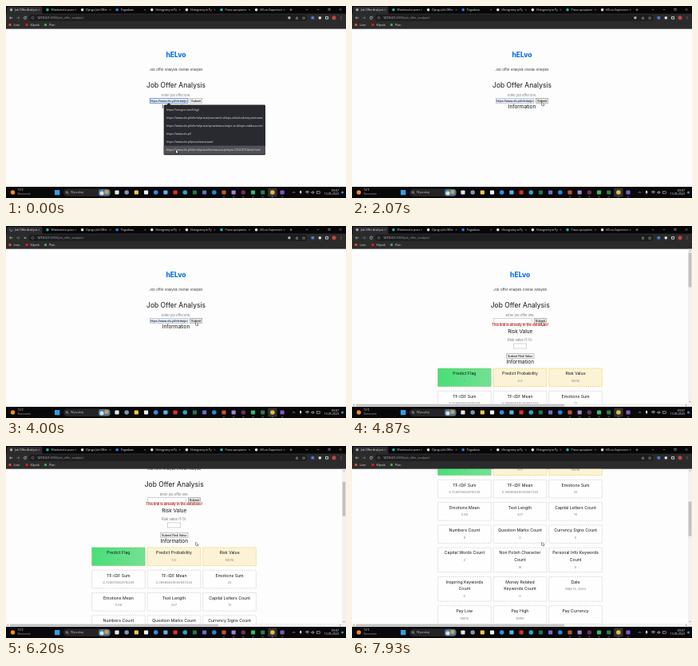
Recreate the animation shown at these times as an HTML page with a canvas. Size 426 by 240 pixels, loop 8000 ms.

```html
<!DOCTYPE html>
<html lang="pl">
<head>
<meta charset="utf-8">
<title>Job Offer Analysis</title>
<style>
  html, body { margin: 0; width: 100%; height: 100%; overflow: hidden; background: #fdfdfd; }
  canvas { display: block; width: 100vw; height: 100vh; }
</style>
</head>
<body>
<canvas id="stage"></canvas>
<script>
const W = 426, H = 240, LOOP = 8000;
const PAGE_TOP = 28.5, PAGE_BOTTOM = 226;
const PICK = 600, CLICK = 2300, LOADED = 4500;
const UI = '"Open Sans", "Noto Sans", sans-serif';
const PAGE = 'Inter, sans-serif';
const FORM = '"Liberation Sans", Arial, sans-serif';
const BRAND = 'hELvo';

const canvas = document.getElementById('stage');
const ctx = canvas.getContext('2d');

// ---------- helpers ----------
function rect(x, y, w, h, color) {
  ctx.fillStyle = color;
  ctx.fillRect(x, y, w, h);
}
function round(x, y, w, h, r, color) {
  ctx.fillStyle = color;
  ctx.beginPath();
  ctx.roundRect(x, y, w, h, r);
  ctx.fill();
}
function frame(x, y, w, h, color, width = 0.5, dash = []) {
  ctx.strokeStyle = color;
  ctx.lineWidth = width;
  ctx.setLineDash(dash);
  ctx.strokeRect(x, y, w, h);
  ctx.setLineDash([]);
}
function dot(x, y, r, color) {
  ctx.fillStyle = color;
  ctx.beginPath();
  ctx.arc(x, y, r, 0, 7);
  ctx.fill();
}
function arc(x, y, r, from, to, color, width = 0.7) {
  ctx.strokeStyle = color;
  ctx.lineWidth = width;
  ctx.beginPath();
  ctx.arc(x, y, r, from, to);
  ctx.stroke();
}
function path(d, x, y, color, width = 0.6) {
  ctx.save();
  ctx.translate(x, y);
  ctx.strokeStyle = color;
  ctx.lineWidth = width;
  ctx.stroke(new Path2D(d));
  ctx.restore();
}
function text(str, x, y, size, color, { font = UI, align = 'left', weight = 400 } = {}) {
  ctx.font = `${weight} ${size}px ${font}`;
  ctx.textAlign = align;
  ctx.textBaseline = 'middle';
  ctx.fillStyle = color;
  ctx.fillText(str, x, y);
}
function centered(str, x, y, size, color = '#151515', weight = 400) {
  text(str, x, y, size, color, { font: PAGE, align: 'center', weight });
}
function clipped(x, y, w, h, draw) {
  ctx.save();
  ctx.beginPath();
  ctx.rect(x, y, w, h);
  ctx.clip();
  draw();
  ctx.restore();
}
function blend(x, w, from, to) {
  const gradient = ctx.createLinearGradient(x, 0, x + w, 0);
  gradient.addColorStop(0, from);
  gradient.addColorStop(1, to);
  return gradient;
}
// keys: [time, value] pairs joined by eased segments
function track(t, keys, ease = u => u) {
  let [t0, v0] = keys[0];
  for (const [t1, v1] of keys) {
    if (t < t1) return v0 + (v1 - v0) * ease(Math.max(0, (t - t0) / (t1 - t0)));
    [t0, v0] = [t1, v1];
  }
  return v0;
}
const smooth = u => u * u * (3 - 2 * u);

// ---------- browser ----------
const TABS = [
  ['Job Offer Analysis', '#9aa0a6'], ['Wiadomości praca', '#20b8b0'],
  ['Django Job Offer', '#d5e8dc'], ['Pogadana', '#2f80ed'],
  ['Histogramy w Py', '#e8e8e8'], ['Histogramy w Py', '#e8e8e8'],
  ['Praca sprzątanie', '#20b8b0'], [BRAND + '-Supervisor', '#f0f0f0'],
];
const BOOKMARKS = [['Listo', 5, '#e6483d'], ['Klipnik', 26, '#f01818'], ['Plan', 49.5, '#3fa757']];
const CROSS = 'M-1.2-1.2L1.2 1.2M1.2-1.2L-1.2 1.2';
const SMALL_CROSS = 'M-.8-.8L.8 .8M.8-.8L-.8 .8';

function drawBrowser(t) {
  const loading = t >= CLICK && t < LOADED;
  rect(0, 0, W, 10, '#070708');
  round(1, 0.8, 44.5, 10, [2, 2, 0, 0], '#2b2b2e');
  TABS.forEach(([label, color], i) => {
    const x = i ? 52 + (i - 1) * 43.6 : 6.5;
    if (!i && loading) {
      const a = t / 160;
      arc(x, 4.7, 1.7, a, a + 4.2, '#8ab4f8');
    } else dot(x, 4.7, 1.8, color);
    clipped(x + 4, 0, 29, 10, () => text(label, x + 4.6, 4.8, 3.45, '#e4e5e7'));
    path(SMALL_CROSS, x + 35, 4.7, '#c5c7ca', 0.4);
  });
  path('M-1.5 0H1.5M0-1.5V1.5', 357, 4.7, '#ddd', 0.5);
  path('M-1.2-.6L0 .6L1.2-.6', 377, 4.5, '#ccc', 0.45);
  path('M-1.2 0H1.2', 391, 4.5, '#ccc', 0.45);
  frame(403.9, 3.4, 2.2, 2.2, '#ccc', 0.45);
  path(CROSS, 419, 4.5, '#ccc', 0.45);

  rect(0, 9.5, W, 19, '#2b2b2b');
  round(28.5, 10.8, 349, 8, 4, '#1d1d1f');
  path('M2 0H-2M-.3-1.6L-2 0L-.3 1.6', 6.5, 14.8, '#dadce0');
  path('M-2 0H2M.3-1.6L2 0L.3 1.6', 15, 14.8, '#85878b');
  if (loading) path(CROSS, 24, 14.8, '#dadce0');
  else {
    arc(24, 14.8, 1.6, 0.3, 5.4, '#dadce0');
    path('M1.7-1.9V-.5H.3', 24, 14.8, '#dadce0', 0.5);
  }
  arc(33.5, 14.8, 1.4, 0, 7, '#bbb', 0.4);
  text('127.0.0.1', 39, 14.8, 3.7, '#f1f3f4');
  const hostWidth = ctx.measureText('127.0.0.1').width;
  text(':8000/job_offer_analysis/', 39 + hostWidth, 14.8, 3.7, '#9aa0a6');

  if (t < LOADED) round(353.4, 13.2, 3, 3, 0.5, '#b0b3b7');
  path('M-1.2 1.4V-.4H1.2V1.4ZM0 .3V-1.8', 364.5, 15, '#b0b3b7', 0.5);
  path('M0-1.7L.6-.5L1.8-.4L.9.4L1.1 1.6L0 1L-1.1 1.6L-.9.4L-1.8-.4L-.6-.5Z', 373, 15, '#b0b3b7', 0.45);
  round(382.5, 13, 3.6, 3.6, 0.6, '#4a7de0');
  round(391.7, 13.2, 3.2, 3.2, 0.8, '#e4e6e8');
  path('M-1.5-1.4H1.5V1.4H-1.5Z', 402, 14.8, '#eeeeee', 0.8);
  dot(411, 14.8, 2.5, '#c2473f');
  for (const dy of [-1.4, 0, 1.4]) dot(420, 14.8 + dy, 0.4, '#dadce0');

  BOOKMARKS.forEach(([label, x, color]) => {
    round(x - 1.5, 22, 3, 3, 0.6, color);
    text(label, x + 4.6, 23.6, 3.6, '#e4e5e7');
  });
}

// ---------- page ----------
function button(label, x, y, w, h, active) {
  round(x, y, w, h, 0.7, active ? '#e4e4e0' : '#efefef');
  frame(x, y, w, h, active ? '#6a6a6a' : '#8c8c8c', 0.4);
  text(label, x + w / 2, y + h / 2 + 0.2, 3.9, '#000', { font: FORM, align: 'center' });
}
function field(x, y, w, h, value, focused) {
  rect(x, y, w, h, value ? '#e3edfb' : '#fff');
  frame(x, y, w, h, focused ? '#3f74c4' : '#92929a', focused ? 0.65 : 0.4);
  if (value) clipped(x + 0.6, y, w - 1.2, h, () =>
    text(value, x + 1, y + h / 2 + 0.2, 3.9, '#000', { font: FORM }));
}
function drawHeader(cx, t) {
  const loaded = t >= LOADED;
  centered(BRAND, cx, 61.6, 8.5, '#0f72ea', 800);
  centered('Job Offer Analysis Overall Analysis', cx, 79.5, 4.05, '#333');
  centered('Job Offer Analysis', cx, 99.4, 8.5);
  centered('Enter job offer link:', cx, 111.6, 4.05, '#777');
  field(cx - 32.8, 115.3, 47.8, 6.2, loaded ? '' : 'https://www.olx.pl/oferta/praca/kierowca', t < PICK);
  button('Submit', cx + 17.5, 115.3, 15.3, 6.2, t > 1900);
}

const CARD_ROWS = [
  [['Predict Flag', '1'], ['Predict Probability', '0.0'], ['Risk Value', 'None']],
  [['TF-IDF Sum', '4.724615083915339'], ['TF-IDF Mean', '0.39685649035587243'], ['Emotions Sum', '22']],
  [['Emotions Mean', '0.66'], ['Text Length', '327'], ['Capital Letters Count', '10']],
  [['Numbers Count', '9'], ['Question Marks Count', '0'], ['Currency Signs Count', '0']],
  [['Capital Words Count', '2'], ['Non Polish Character|Count', '16'], ['Personal Info Keywords|Count', '0']],
  [['Inspiring Keywords|Count', '0'], ['Money Related|Keywords Count', '0'], ['Date', 'May 13, 2023']],
  [['Pay Low', 'None'], ['Pay High', 'None'], ['Pay Currency', '']],
];
function cardStyle(row, column, x, w) {
  if (row) return ['#fefefe', '#d3c3cc'];
  if (column) return ['#fcf3d6', '#e6c93c'];
  return [blend(x, w, '#48df78', '#74e094'), '#6fc04a'];
}
function drawCards() {
  const w = 66.6;
  let y = 178;
  CARD_ROWS.forEach((row, r) => {
    const tall = row.some(([title]) => title.includes('|'));
    const h = tall ? 30.6 : 22.6;
    row.forEach(([title, value], c) => {
      const x = 107.6 + c * 69.6, mid = x + w / 2;
      const [fill, border] = cardStyle(r, c, x, w);
      rect(x, y, w, h, fill);
      frame(x, y, w, h, border, 0.7, [1.6, 1.1]);
      const lines = title.split('|');
      lines.forEach((line, i) => centered(line, mid, y + 6.8 + i * 8.6, 5.2));
      centered(value, mid, y + 7 + lines.length * 8.6, 4.05, '#858585');
    });
    y += h + 5.7;
  });
}
function drawScrollbars(scroll) {
  rect(421, PAGE_TOP, 5, PAGE_BOTTOM - PAGE_TOP, '#f1f1f1');
  rect(0, 222.2, 421, 3.8, '#f1f1f1');
  rect(421.6, 33.5 + scroll * 0.22, 3.8, 43, '#c1c1c1');
  rect(5, 222.8, 261, 2.6, '#c1c1c1');
  path('M-1 .5L0-.6L1 .5', 423.5, 31, '#666');
  path('M-1-.5L0 .6L1-.5', 423.5, 219.5, '#666');
  path('M.5-1L-.6 0L.5 1', 2.5, 224.1, '#666');
  path('M-.5-1L.6 0L-.5 1', 418.5, 224.1, '#666');
}
function drawPage(t) {
  rect(0, PAGE_TOP, W, PAGE_BOTTOM - PAGE_TOP, '#fdfdfd');
  if (t < LOADED) {
    drawHeader(213, t);
    centered('Information', 213, 126, 6.4);
    return;
  }
  const cx = 210.7;
  const scroll = track(t, [[5420, 0], [6200, 51], [7930, 164], [LOOP, 168]]);
  ctx.save();
  ctx.translate(0, -scroll);
  drawHeader(cx, t);
  centered('This link is already in the database!', cx, 124.1, 4.15, '#c62f2a', 700);
  centered('Risk Value', cx, 132.2, 6.4);
  centered('Risk value (1-5):', cx, 143.1, 4.15, '#777');
  field(202.3, 147, 16.5, 6, '');
  button('Submit Risk Value', 193.3, 159.4, 34.8, 6);
  centered('Information', cx, 170.1, 6.4);
  drawCards();
  ctx.restore();
  drawScrollbars(scroll);
}

const SUGGESTIONS = [
  'https://enrype.com/blog/',
  'https://www.olx.pl/oferta/praca/pracownik-sklepu-odzial-odziezy-warszawa',
  'https://www.olx.pl/oferta/praca/sprzedawca-kasjer-w-sklepie-zabka-w-centrum',
  'https://www.olx.pl/',
  'https://www.olx.pl/praca/warszawa/',
  'https://www.olx.pl/oferta/praca/kierowca-w-pelnym-CID4-ID10abcd.html',
];
function drawSuggestions() {
  ctx.fillStyle = '#292a2f';
  ctx.fill(new Path2D('M201 124L204 121.2L207 124Z'));
  round(197.7, 123.6, 127.3, 62.6, 1.2, '#292a2f');
  rect(197.7, 174.6, 127.3, 10.4, '#505156');
  clipped(200, 124, 121.5, 62, () => SUGGESTIONS.forEach((url, i) =>
    text(url, 201, 129.6 + i * 10.06, 3.5, '#e8e8ea')));
}

// ---------- taskbar ----------
const APPS = ['#e6e6e6', '#8293ad', '#f3c64b', '#f4f4f4', '#2d8fe8', '#55b8ea', '#d8322d', '#29a8c4', '#23744f',
  '#6a6fc4', '#2489d8', '#c4552d', '#a283d6', '#6d2f59', '#2fbf63', '#2b7b51', '#e9b93c', '#8056c4'];

function drawTaskbar() {
  rect(0, PAGE_BOTTOM, W, H - PAGE_BOTTOM, '#08080a');
  dot(8.5, 233, 2.7, '#f28b22');
  text('12°C', 14.5, 230.6, 3.4, '#eee');
  text('Słonecznie', 14.5, 235.5, 3.3, '#a9a9a9');
  rect(61, 230, 6.3, 6.3, '#2f9fe8');
  round(71.8, 228.4, 59.4, 9.6, 4.8, '#242427');
  arc(76.3, 232.8, 1.2, 0, 7, '#eee', 0.5);
  path('M.9.9L2 2', 76.3, 232.8, '#eee', 0.5);
  text('Wyszukaj', 81, 233.1, 3.7, '#c8c8c8');
  round(116, 229, 14.4, 8.4, 3, '#4b7897');
  dot(120, 234, 2.5, '#d8e0e7');
  dot(126, 232.5, 2.6, '#d79a50');
  round(328.2, 227.6, 11.4, 11, 1.3, '#303136');
  APPS.forEach((color, i) => {
    const x = 139 + i * 12.18;
    if (i % 3 === 1) dot(x, 233, 2.8, color);
    else round(x - 2.6, 230.4, 5.2, 5.2, 1, color);
    if (i > 10) rect(x - 1.2, 238.5, 2.4, 0.6, '#8d949c');
  });
  path('M-1.5.7L0-.8L1.5.7', 360.5, 233, '#eee');
  round(368.2, 230.7, 1.8, 3.2, 0.9, '#eee');
  path('M-1.6 0Q0 2.4 1.6 0M0 1.2V2.5', 369.1, 233, '#eee', 0.4);
  for (const r of [1.2, 2.4, 3.6]) arc(377.5, 235, r, 3.93, 5.5, '#eee', 0.6);
  path('M-1.8-.6H-.8L.4-1.6V1.6L-.8.6H-1.8ZM1.2-1Q2 0 1.2 1', 384.5, 233, '#eee', 0.5);
  frame(389.2, 231.8, 4, 2.4, '#eee', 0.5);
  text('09:07', 417, 230.6, 3.6, '#eee', { align: 'right' });
  text('13.05.2023', 417, 235.5, 3.6, '#eee', { align: 'right' });
  dot(421.5, 233, 1.5, '#3e8fc5');
}

function drawCursor(t) {
  const x = track(t, [[PICK, 213], [1100, 238], [LOOP, 238]], smooth);
  const y = track(t, [[PICK, 180], [1100, 133.4], [1450, 133.4], [1950, 120.6], [LOOP, 120.6]], smooth);
  const arrow = new Path2D('M0 0V3.7L.9 2.9L1.6 4.3L2.2 4L1.6 2.7H2.7Z');
  ctx.save();
  ctx.translate(x, y);
  ctx.fillStyle = '#fff';
  ctx.strokeStyle = '#111';
  ctx.lineWidth = 0.9;
  ctx.stroke(arrow);
  ctx.fill(arrow);
  ctx.restore();
}

function render(now) {
  const t = now % LOOP;
  const ratio = window.devicePixelRatio || 1;
  const width = Math.round(innerWidth * ratio), height = Math.round(innerHeight * ratio);
  if (canvas.width !== width || canvas.height !== height) Object.assign(canvas, { width, height });
  ctx.setTransform(width / W, 0, 0, height / H, 0, 0);
  drawPage(t);
  drawBrowser(t);
  drawTaskbar();
  if (t < PICK) drawSuggestions();
  drawCursor(t);
}

const start = performance.now();
function tick() {
  render(performance.now() - start);
  requestAnimationFrame(tick);
}
tick();
</script>
</body>
</html>
```
